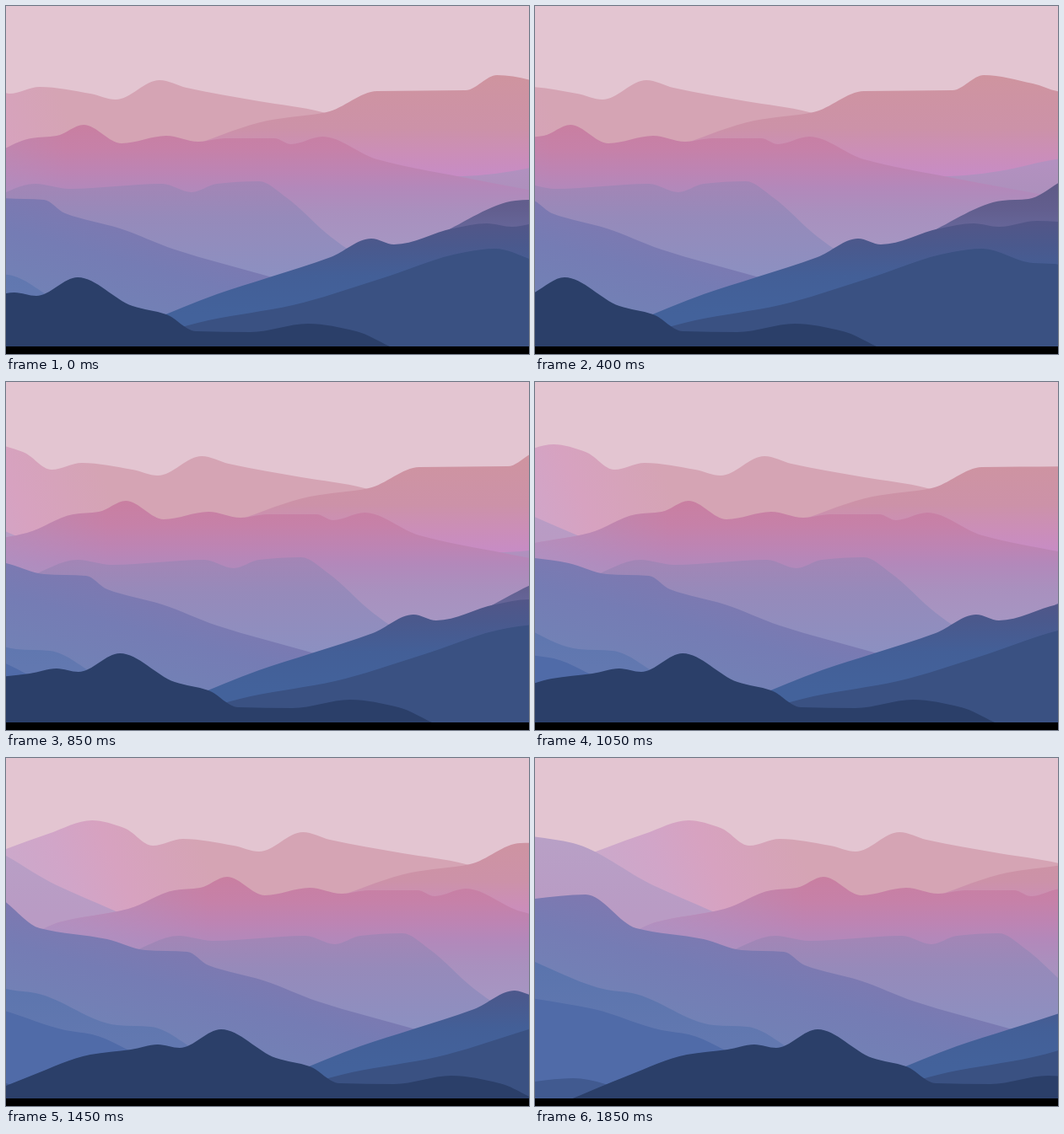
An HTML page with a canvas for the animation above (1.9 s loop, 620 by 413 pixels).

```html
<!DOCTYPE html>
<html lang="en">
<head>
<meta charset="utf-8">
<title>Misty mountains</title>
<style>
html, body { margin: 0; height: 100%; overflow: hidden; background: #000; }
canvas { display: block; }
</style>
</head>
<body>
<canvas id="stage" width="620" height="413"></canvas>
<script>
const ctx = document.getElementById('stage').getContext('2d');
const FLOOR = 404, STEP = 50, FRAMES = 38;
const layers = [];

// Gradient along a line; stops are [position, colour] pairs.
function blend(x0, y0, x1, y1, ...stops) {
  const g = ctx.createLinearGradient(x0, y0, x1, y1);
  for (const [at, colour] of stops) g.addColorStop(at, colour);
  return g;
}

// Vertical gradient; stops are [y, colour] pairs.
const fade = (...stops) =>
  blend(0, 0, 0, FLOOR, ...stops.map(([y, colour]) => [y / FLOOR, colour]));

// Crest through the [x, y] peaks, dips and bends, flat at each peak and dip,
// filled down to the floor.
function ridge(fills, ...key) {
  const steep = i => (key[i + 1][1] - key[i][1]) / (key[i + 1][0] - key[i][0]);
  const slope = key.map((_, i) => {
    if (i === 0) return steep(0);
    if (i === key.length - 1) return steep(i - 1);
    const a = steep(i - 1), b = steep(i);
    return a * b > 0 ? 2 * a * b / (a + b) : 0;
  });
  const path = new Path2D();
  path.moveTo(key[0][0], FLOOR);
  path.lineTo(...key[0]);
  for (let i = 1; i < key.length; i++) {
    const [x0, y0] = key[i - 1], [x1, y1] = key[i], d = (x1 - x0) / 3;
    path.bezierCurveTo(x0 + d, y0 + d * slope[i - 1], x1 - d, y1 - d * slope[i], x1, y1);
  }
  path.lineTo(key[key.length - 1][0], FLOOR);
  for (const fill of [fills].flat()) layers.push({ path, fill });
}

// Far pink range
ridge(blend(-150, 190, 60, 100,
    [0, '#cba9cb'], [.3, '#d1a5c8'], [.55, '#d7a2c0'], [1, '#d5a4b4']),
  [-210, 123], [-120, 90], [-68, 74], [-30, 83], [4, 104], [40, 96], [100, 104],
  [130, 111], [182, 88], [214, 97], [300, 113], [375, 126], [420, 150]);
ridge(fade([82, '#cf949f'], [145, '#cc92a8'], [175, '#cb8eb8'], [200, '#c78cc4']),
  [225, 164], [310, 136], [380, 126], [440, 101], [545, 100], [582, 82], [640, 92],
  [675, 102], [740, 104]);
// Mauve slopes at both ends
ridge(fade([94, '#b8a0c6'], [185, '#b99bc4']),
  [-260, 92], [-205, 101], [-110, 151], [-42, 181], [0, 200]);
ridge(fade([180, '#b491c0'], [215, '#ae90bd'], [290, '#a496c2']),
  [450, 206], [560, 201], [600, 196], [690, 180], [740, 191]);
// Rose ridge, misty on its left
ridge([
    fade([141, '#c97fa1'], [170, '#c681a8'], [195, '#bd84b3'], [215, '#b388ba'],
      [245, '#a990be'], [300, '#a498c4']),
    blend(-130, 0, 70, 0, [0, 'rgba(170, 152, 200, .65)'], [1, 'rgba(170, 152, 200, 0)'])
  ],
  [-140, 210], [-107, 195], [-25, 179], [30, 157], [60, 154], [92, 141], [137, 163],
  [190, 154], [228, 161], [260, 157], [318, 157], [338, 164], [375, 155], [440, 182],
  [540, 203], [740, 240]);
// Violet hump
ridge(fade([208, '#a485b5'], [250, '#968aba'], [320, '#8c90c1']),
  [-25, 232], [35, 211], [75, 217], [185, 211], [220, 221], [250, 211], [300, 208],
  [332, 227], [385, 274], [440, 312]);
// Blue ridges on the left
ridge(blend(20, 215, -15, 345, [0, '#7f78b0'], [.4, '#757cb4'], [1, '#7183b6']),
  [-260, 168], [-190, 162], [-130, 202], [-50, 215], [-5, 228], [45, 230], [70, 246],
  [135, 264], [200, 289], [312, 321], [350, 332]);
ridge(fade([241, '#5a74ad'], [337, '#6278b0']),
  [-260, 238], [-165, 275], [-135, 279], [-38, 317], [2, 319], [60, 350]);
ridge('#506ba8', [-260, 284], [-180, 298], [-100, 323], [-68, 328], [0, 360]);
ridge('#415a90', [-260, 385], [-205, 380], [-130, 398]);
// Dark slopes on the right
ridge(fade([203, '#5e5985'], [240, '#625e8e'], [265, '#666699']),
  [515, 270], [604, 231], [635, 229], [690, 203], [740, 210]);
ridge(fade([258, '#525688'], [285, '#4a598d'], [320, '#435f97'], [365, '#43629b']),
  [170, 374], [250, 342], [312, 322], [385, 298], [433, 276], [460, 283], [530, 264],
  [570, 258], [600, 262], [645, 255], [740, 263]);
ridge('#3a5182',
  [190, 386], [240, 373], [340, 355], [440, 325], [545, 292], [580, 288], [640, 305],
  [665, 306], [740, 344]);
// Front hills
ridge('#2b3f69',
  [-215, 408], [-140, 377], [-70, 352], [-22, 346], [10, 340], [36, 344], [85, 322],
  [150, 356], [190, 366], [225, 386], [290, 387], [358, 377], [415, 386], [455, 404]);

// The loop opens on the middle view, then pans from end to end without it.
const panAt = i => i === 0 ? 0 : 10 * (i - (i < 13 ? 13 : 12));

function draw(now) {
  const frame = Math.floor(now / STEP) % FRAMES;
  ctx.fillStyle = '#e3c5d1';
  ctx.fillRect(0, 0, 620, FLOOR);
  ctx.save();
  ctx.translate(panAt(frame), 0);
  for (const { path, fill } of layers) {
    ctx.fillStyle = fill;
    ctx.fill(path);
  }
  ctx.restore();
  ctx.fillStyle = '#000';
  ctx.fillRect(0, FLOOR, 620, 9);
}

const start = performance.now();
function tick() {
  draw(performance.now() - start);
  requestAnimationFrame(tick);
}
tick();
</script>
</body>
</html>
```
